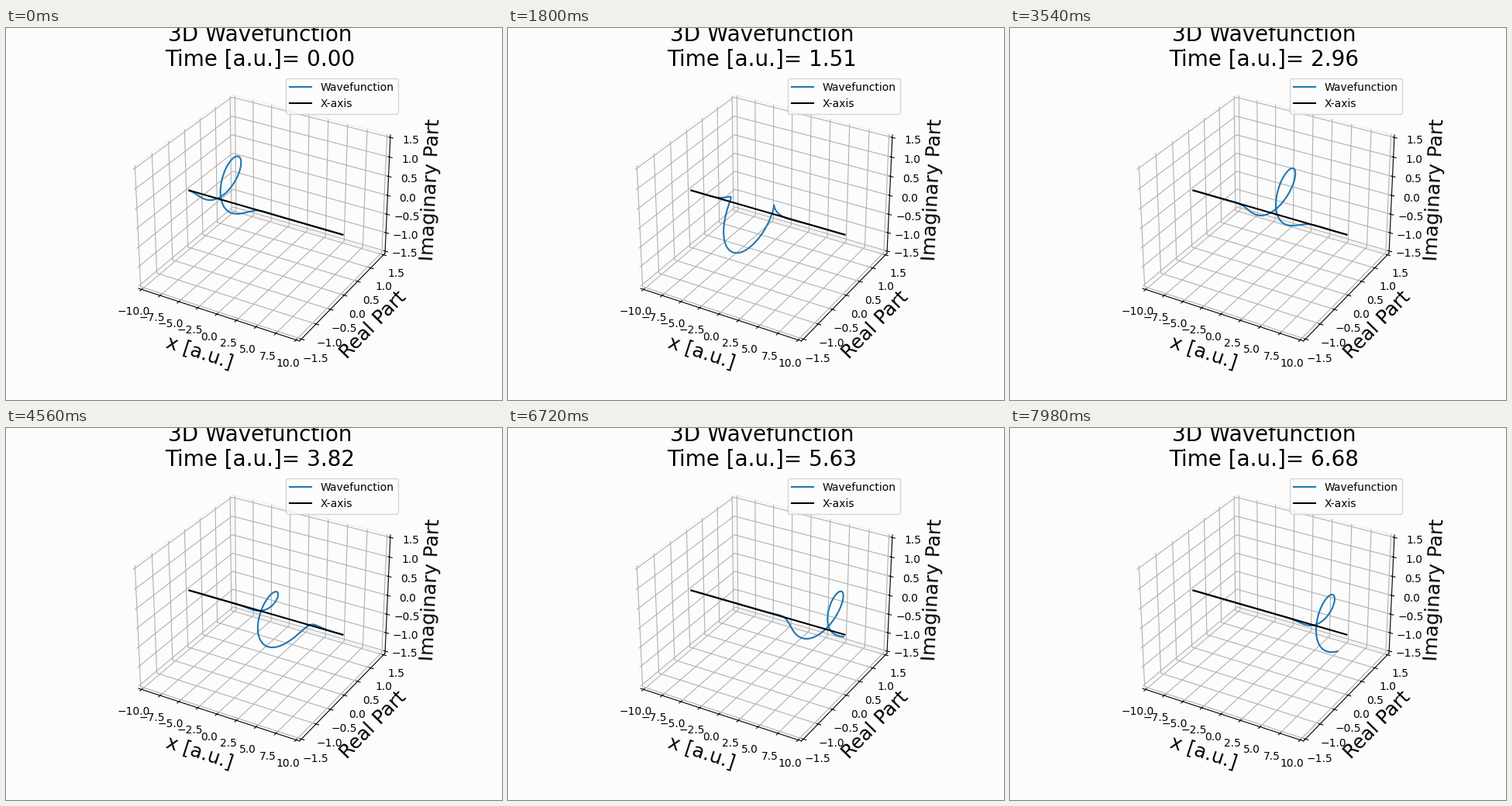
These frames come from a looping animation (640x480 px, 8 s). A matplotlib script:

```python
import numpy as np
import matplotlib.pyplot as plt
from matplotlib.animation import FuncAnimation
from matplotlib.lines import Line2D
from matplotlib.transforms import IdentityTransform
from mpl_toolkits.mplot3d import proj3d

FRAMES, INTERVAL, HOLD = 400, 20, 3
X0, SPEED, K = -5, 2, 1
PAPER = "#fcfcfc"

plt.rcParams.update({
    "axes3d.automargin": True,
    "figure.facecolor": PAPER,
    "axes.facecolor": PAPER,
})
times = np.linspace(0, 10, 200)
x = np.linspace(-10, 10, 500)


def wave(t):
    return np.exp(1j * K * x) / np.cosh(x - X0 - SPEED * t)


def title(t):
    return f"3D Wavefunction\nTime [a.u.]= {t:.2f}"


fig = plt.figure(figsize=(6.4, 4.8), dpi=100)
ax = fig.add_subplot(projection="3d")
ax.plot([], [], [], color="C0", label="Wavefunction")
ax.plot([], [], [], color="black", label="X-axis")
ax.set(xlim=(-10, 10), ylim=(-1.5, 1.5), zlim=(-1.5, 1.5))
ax.set_xlabel("x [a.u.]", fontsize=18)
ax.set_ylabel("Real Part", fontsize=18)
ax.set_zlabel("Imaginary Part", fontsize=18)
for axis in (ax.xaxis, ax.yaxis, ax.zaxis):
    axis.pane.set_fill(False)
ax.legend()

# The axes never change, so render them once and keep the picture.
fig.canvas.draw()
backdrop = np.array(fig.canvas.buffer_rgba())
proj = ax.get_proj()
to_px = ax.transData.frozen()
tx, ty = ax.title.get_transform().transform(ax.title.get_position())
ax.set_visible(False)
fig.figimage(backdrop)


def project(re, im):
    px, py, _ = proj3d.proj_transform(x, re, im, proj)
    return to_px.transform(np.column_stack([px, py])).T


def add_line(re, im, color):
    line = Line2D(*project(re, im), color=color, transform=IdentityTransform())
    return fig.add_artist(line)


psi0 = wave(0)
curve = add_line(psi0.real, psi0.imag, "C0")
add_line(0 * x, 0 * x, "black")
heading = fig.text(tx / 640, ty / 480, title(0), fontsize=20,
                   ha="center", va="baseline")


def update(n):
    t = times[n // HOLD]
    psi = wave(t)
    curve.set_data(*project(psi.real, psi.imag))
    heading.set_text(title(t))
    return curve, heading


anim = FuncAnimation(fig, update, frames=FRAMES, interval=INTERVAL, repeat=True)
plt.show()
```
